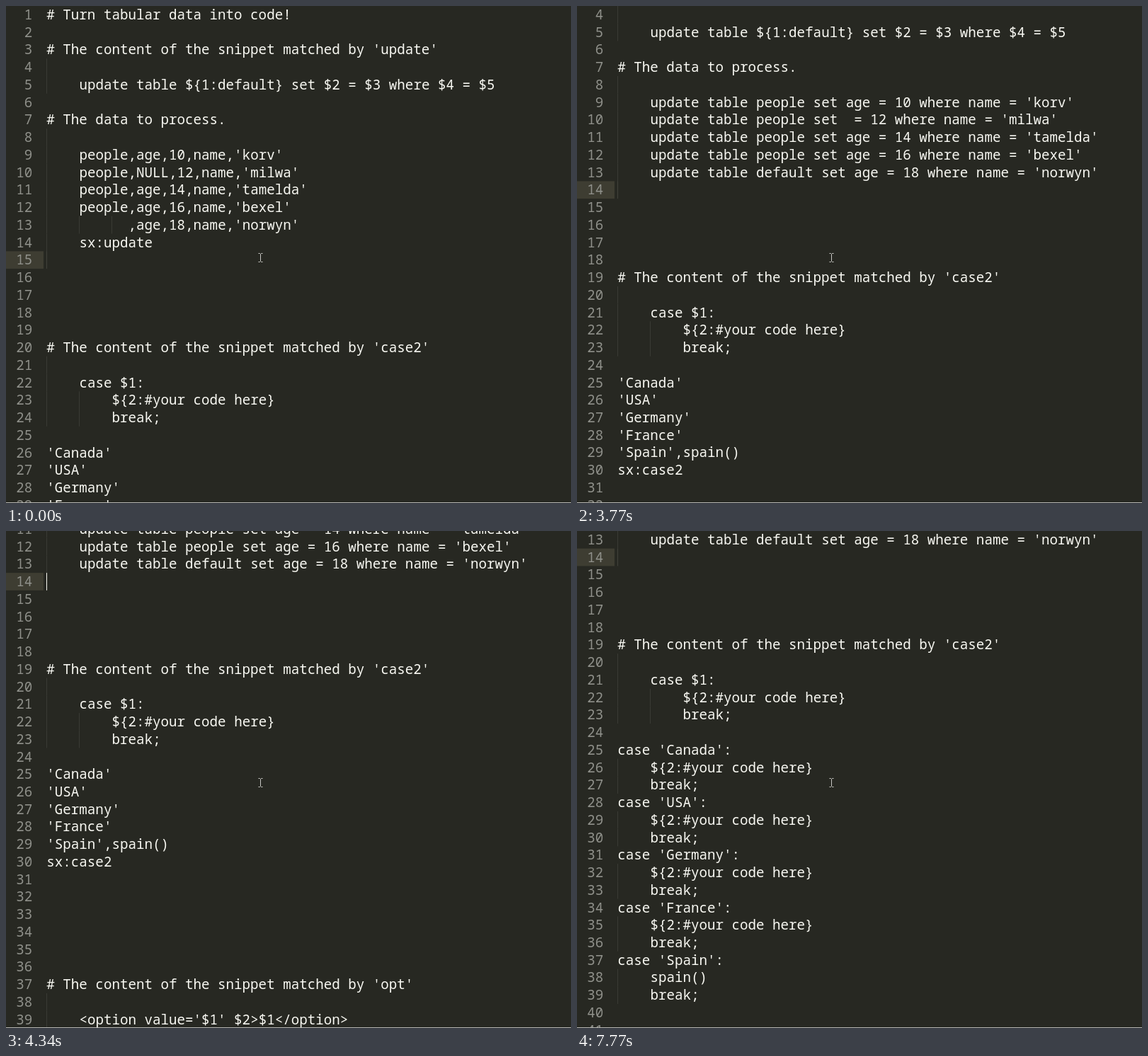
These frames come from a looping animation (798x702 px, 8 s). An HTML page:

```html
<!DOCTYPE html>
<html lang="en">
<head>
<meta charset="utf-8">
<title>Tabular data into code</title>
<style>
html, body { margin: 0; width: 100%; height: 100%; overflow: hidden; background: #272822; }
svg { display: block; width: 798px; height: 702px; }
text {
  font: 19.2px "Noto Sans Mono", "DejaVu Sans Mono", monospace;
  font-variant-ligatures: none;
  white-space: pre;
  fill: #f8f8f2;
}
.num { fill: #8f908a; text-anchor: end; }
.guide { fill: #3a3b34; }
</style>
</head>
<body>
<svg id="stage" viewBox="0 0 798 702">
  <rect width="798" height="702" fill="#272822"/>
  <g id="page">
    <rect id="active" width="53" fill="#3e3d32"/>
    <g id="numbers"></g>
    <g id="code"></g>
    <rect id="caret" x="57" width="1" fill="#f8f8f0"/>
  </g>
  <path d="M356.5 349.5h2l1 1l1-1h2M359.5 350.5v10M356.5 361.5h2l1-1l1 1h2" fill="none" stroke="#c9c9c5"/>
  <rect y="701" width="798" height="1" fill="#b5b5b2"/>
</svg>
<script>
const LOOP = 8000, ROW = 24.74, COL = 11.52, LEFT = 57.3, BASE = 19;
const $ = id => document.getElementById(id);

function add(parent, tag, attrs, content) {
  const el = document.createElementNS("http://www.w3.org/2000/svg", tag);
  for (const key in attrs) el.setAttribute(key, attrs[key]);
  if (content) el.textContent = content;
  parent.appendChild(el);
}

const blank = n => Array(n).fill("");
const title = name => `# The content of the snippet matched by '${name}'`;
const update = (table, field, age, name) =>
  `    update table ${table} set ${field} = ${age} where name = '${name}'`;
const caseOf = (country, body = "${2:#your code here}") =>
  [`case '${country}':`, "    " + body, "    break;"];

const countries = ["Canada", "USA", "Germany", "France"];
const head = [
  "# Turn tabular data into code!", "",
  title("update"), "",
  "    update table ${1:default} set $2 = $3 where $4 = $5", "",
  "# The data to process.", ""
];
const raw = [
  "    people,age,10,name,'korv'",
  "    people,NULL,12,name,'milwa'",
  "    people,age,14,name,'tamelda'",
  "    people,age,16,name,'bexel'",
  "          ,age,18,name,'norwyn'",
  "    sx:update"
];
const updated = [
  update("people", "age", 10, "korv"),
  update("people", "", 12, "milwa"),
  update("people", "age", 14, "tamelda"),
  update("people", "age", 16, "bexel"),
  update("default", "age", 18, "norwyn")
];
const snippet = [
  ...blank(5), title("case2"), "",
  "    case $1:", "        ${2:#your code here}", "        break;", ""
];
const list = [...countries.map(c => `'${c}'`), "'Spain',spain()", "sx:case2"];
const cases = [...countries.flatMap(c => caseOf(c)), ...caseOf("Spain", "spain()")];
const tail = [
  ...blank(6), title("opt"), "",
  "    <option value='$1' $2>$1</option>", "", "New York"
];
const docs = [
  [...head, ...raw, ...snippet, ...list, ...tail],
  [...head, ...updated, ...snippet, ...list, ...tail],
  [...head, ...updated, ...snippet, ...cases, ...tail]
];

// Each track lists [start time, value]; values hold until the next entry.
const docTrack = [[0, 0], [1250, 1], [7350, 2]];
const scrollTrack = [[0, 0], [3770, 3], [3910, 4.61], [4040, 6], [4190, 9], [4340, 10.61], [4460, 12]];
const caretTrack = [
  [0, .12], [130, 0], [580, 1], [1680, .5], [1800, 0], [2230, .5], [2350, 1],
  [2750, 0], [3310, .9], [3460, 1], [3770, .12], [3910, 0], [4190, .5], [4340, 1],
  [4710, .5], [4830, 0], [5410, 1], [5780, .12], [5930, 0], [6360, .5], [6480, 1],
  [6790, .5], [6910, 0], [7350, 1], [7770, .12]
];
const valueAt = (track, t) => track.findLast(step => step[0] <= t)[1];

const indentOf = line => line ? line.search(/\S/) : 0;

function drawDoc(lines) {
  const code = $("code");
  code.replaceChildren();
  lines.forEach((line, i) => {
    const indent = indentOf(line);
    // A blank line takes the guides of the line below it.
    const depth = Math.ceil((line ? indent : indentOf(lines[i + 1])) / 4);
    for (let d = 0; d < depth; d++) {
      add(code, "rect", {
        class: "guide", x: Math.round(57 + d * 4 * COL), y: i * ROW, width: 1, height: ROW
      });
    }
    if (line) add(code, "text", { x: LEFT + indent * COL, y: i * ROW + BASE }, line.trimStart());
  });
}

for (let i = 0; i < 42; i++) {
  add($("numbers"), "text", { class: "num", x: 37.3, y: i * ROW + BASE }, String(i + 1));
}
for (const id of ["active", "caret"]) $(id).setAttribute("height", ROW);

let shown = -1;
function render(t) {
  const doc = valueAt(docTrack, t);
  if (doc !== shown) {
    drawDoc(docs[doc]);
    shown = doc;
  }
  const y = (doc ? 13 : 14) * ROW;
  $("active").setAttribute("y", y);
  $("caret").setAttribute("y", y);
  $("caret").setAttribute("opacity", valueAt(caretTrack, t));
  $("page").setAttribute("transform", `translate(0 ${-valueAt(scrollTrack, t) * ROW})`);
}

const start = performance.now();
function tick() {
  render((performance.now() - start) % LOOP);
  requestAnimationFrame(tick);
}
tick();
</script>
</body>
</html>
```
